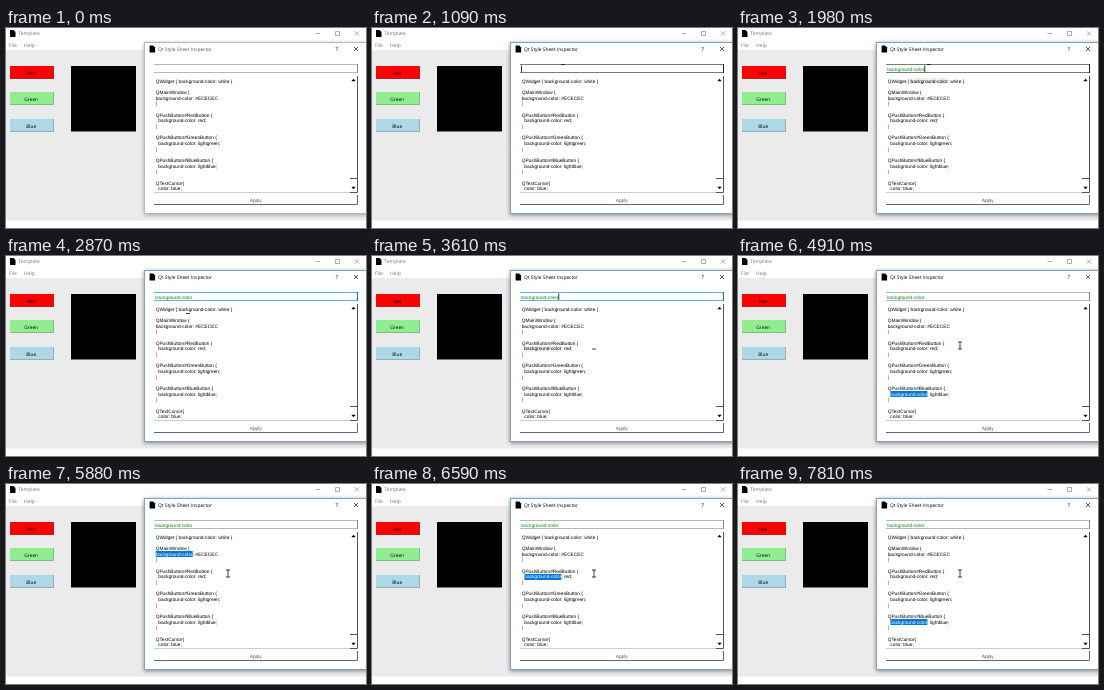
These frames come from a looping animation (360 by 200 pixels, 8 s). An HTML page:

```html
<!DOCTYPE html>
<html lang="en">
<head>
<meta charset="utf-8">
<title>Style sheet inspector</title>
<style>
html, body { margin: 0; width: 100%; height: 100%; overflow: hidden; background: #fff; }
svg { display: block; width: 360px; height: 200px; }
text { font-family: "Open Sans", "Noto Sans", sans-serif; font-size: 5px; text-rendering: geometricPrecision; }
.code text, text.code { font-family: "Liberation Sans", Arial, sans-serif; font-size: 4.79px; }
.code text { fill: currentColor; }
.line { fill: none; stroke: #333; stroke-width: .8px; }
</style>
</head>
<body>
<svg viewBox="0 0 360 200">
  <defs>
    <path id="page" d="M0 0H3.5L5.5 2V7H0Z"/>
    <clipPath id="view"><rect x="149" y="48" width="195" height="116"/></clipPath>
    <filter id="soft"><feGaussianBlur stdDeviation="2"/></filter>
  </defs>

  <!-- main window -->
  <rect y="22" width="360" height="170.5" fill="#ebebeb"/>
  <use href="#page" x="4" y="2"/>
  <text x="12.3" y="7.4" fill="#777">Template</text>
  <path class="line" style="stroke:#999" d="M309.5 5.5H314M329.5 3.5H333.5V7.5H329.5ZM348.8 3.3L353.2 7.7M353.2 3.3L348.8 7.7"/>
  <g fill="#777"><text x="3" y="18.9">File</text><text x="18" y="18.9">Help</text></g>
  <g id="buttons"></g>
  <rect x="65" y="38" width="65" height="65.5"/>

  <!-- dialog -->
  <rect id="shadow" x="138" y="15" width="240" height="172" filter="url(#soft)"/>
  <rect id="frame" x="138.5" y="14.5" width="225" height="171" fill="#fff"/>
  <use href="#page" x="143.6" y="17.4"/>
  <text id="title" x="152" y="22.9" style="font-size:4.85px">Qt Style Sheet Inspector</text>
  <text x="329.6" y="23" fill="#111" style="font-size:5.6px">?</text>
  <path class="line" d="M348 19L352 23M352 19L348 23"/>

  <g id="field" fill="none">
    <path d="M148 36.5H351M148 44.5H351" stroke-opacity=".6"/>
    <path d="M351.5 36V45"/>
  </g>
  <text id="query" class="code" x="149.3" y="42.7" fill="#008a10">background-color</text>

  <path d="M148 164.5H344" stroke="#ccc"/>
  <path d="M351.5 48V164.5H344M344 150.5H352" fill="none" stroke="#555"/>
  <path d="M345.3 53.2L347.5 50.8L349.7 53.2ZM345.3 158.8L347.5 161.2L349.7 158.8Z"/>
  <g class="code" clip-path="url(#view)">
    <g id="rows"></g>
    <rect id="mark" height="6"/>
    <text id="marked">background-color</text>
  </g>
  <path d="M148 176.5H351.5V167" fill="none" stroke="#666"/>
  <text class="code" x="243.7" y="173.7" fill="#555">Apply</text>

  <rect id="caret" width=".8" height="6.5"/>
  <g id="beam" class="line" style="stroke:#111">
    <path d="M-2 3.5H2"/>
    <path id="stem" d="M-2 -3.5H2M0 -3.5V3.5"/>
  </g>
  <path id="arrow" d="M0 0V7L1.6 5.5L2.7 8L3.8 7.5L2.8 5.1H5Z" fill="#fff" stroke="#000" stroke-width=".6"/>
</svg>
<script>
const LOOP = 8000;
const $ = id => document.getElementById(id);
const add = (parent, tag, attrs, content = '') => {
  const node = document.createElementNS('http://www.w3.org/2000/svg', tag);
  set(node, attrs);
  node.textContent = content;
  return parent.appendChild(node);
};
function set(node, attrs) {
  for (const name in attrs) node.setAttribute(name, attrs[name]);
}
const show = (node, visible) => set(node, { visibility: visible ? 'visible' : 'hidden' });

[['Red', '#f00'], ['Green', '#90ee90'], ['Blue', '#add8e6']].forEach(([name, fill], i) => {
  const y = 38 + Math.round(i * 26.3);
  add($('buttons'), 'rect', { x: 4, y, width: 44, height: 13, fill });
  add($('buttons'), 'path', { d: `M4 ${y + 12.5}H47.5V${y}`, fill: 'none', stroke: '#555', 'stroke-opacity': .3 });
  add($('buttons'), 'text', { x: 25.2, y: y + 8.7, 'text-anchor': 'middle', style: 'font-size:4.8px' }, name);
});

const rule = name => `QPushButton#${name}Button {\n  background-color: ${name === 'Red' ? 'red' : 'light' + name.toLowerCase()};\n}\n\n`;
const sheet = 'QWidget { background-color: white }\n\nQMainWindow {\nbackground-color: #ECECEC\n}\n\n' +
  rule('Red') + rule('Green') + rule('Blue') + 'QTextCursor{\n  color: blue;';
const rowTop = i => 50 + i * 5.66;
const rows = sheet.split('\n').map((line, i) =>
  add($('rows'), 'text', { x: 149.7, y: rowTop(i) + 4.7, color: line === '}' ? '#733' : '#000' },
    line.replace(/ /g, '\u00a0')));

// [start, matched row, keyboard focus in the editor]; row -1 is no match
const matches = [
  [0, -1], [1750, 0], [2390, -1], [2920, 3], [3400, 7], [3840, -1],
  [4070, 7, true], [4490, 11, true], [4910, 15, true], [5420, 0, true],
  [5880, 3, true], [6590, 7, true], [7280, 11, true], [7810, 15, true]
];
// [start, end, x, y]
const carets = [
  [1000, 1600, 149.2, 37.5], [1750, 2280, 186.4, 37.5], [2920, 3840, 186.4, 37.5],
  [3840, 4070, 207, 84], [6010, 6440, 186.5, 67]
];
// [start, end, x, y] of each pointer move
const moves = [
  [220, 550, 191, 38], [910, 1090, 191, 33], [1980, 2390, 182, 54],
  [2870, 3070, 182, 70], [3350, 3610, 222, 89.5]
];
const fieldColors = [[0, '#888'], [500, '#222'], [2200, '#0078d7'], [3815, '#888']];

const latest = (steps, t) => steps.filter(step => step[0] <= t).pop();

function pointer(t) {
  let x = 228, y = 204;
  for (const [start, end, toX, toY] of moves) {
    const p = Math.min(1, Math.max(0, (t - start) / (end - start)));
    const eased = p * p * (3 - 2 * p);
    x += (toX - x) * eased;
    y += (toY - y) * eased;
  }
  return [x, y];
}

function drawMatch(t) {
  const [, row, focused] = latest(matches, t);
  show($('mark'), row >= 0);
  show($('marked'), row >= 0);
  if (row < 0) return;
  const line = rows[row], first = line.textContent.indexOf('background');
  const x = line.getStartPositionOfChar(first).x;
  const width = line.getEndPositionOfChar(first + 15).x - x;
  set($('mark'), { x, y: Math.round(rowTop(row)), width, fill: focused ? '#0078d7' : '#f0f0f0' });
  set($('marked'), { x, y: rowTop(row) + 4.7, color: focused ? '#fff' : '#000' });
}

function draw(t) {
  const active = t >= 910;
  set($('frame'), { stroke: active ? '#7fa3c0' : '#b4b8bc' });
  set($('shadow'), { opacity: active ? .45 : .3 });
  set($('title'), { fill: active ? '#000' : '#555' });
  set($('field'), { stroke: latest(fieldColors, t)[1] });
  show($('query'), t >= 1750);
  drawMatch(t);

  const caret = carets.find(([start, end]) => t >= start && t < end);
  show($('caret'), caret);
  if (caret) set($('caret'), { x: caret[2], y: caret[3] });

  const [x, y] = pointer(t);
  const overText = y < 164;
  show($('arrow'), !overText);
  show($('beam'), overText);
  show($('stem'), overText && t >= 3790);
  for (const id of ['arrow', 'beam']) set($(id), { transform: `translate(${x} ${y})` });
}

function tick() {
  draw(performance.now() % LOOP);
  requestAnimationFrame(tick);
}
tick();
</script>
</body>
</html>
```
